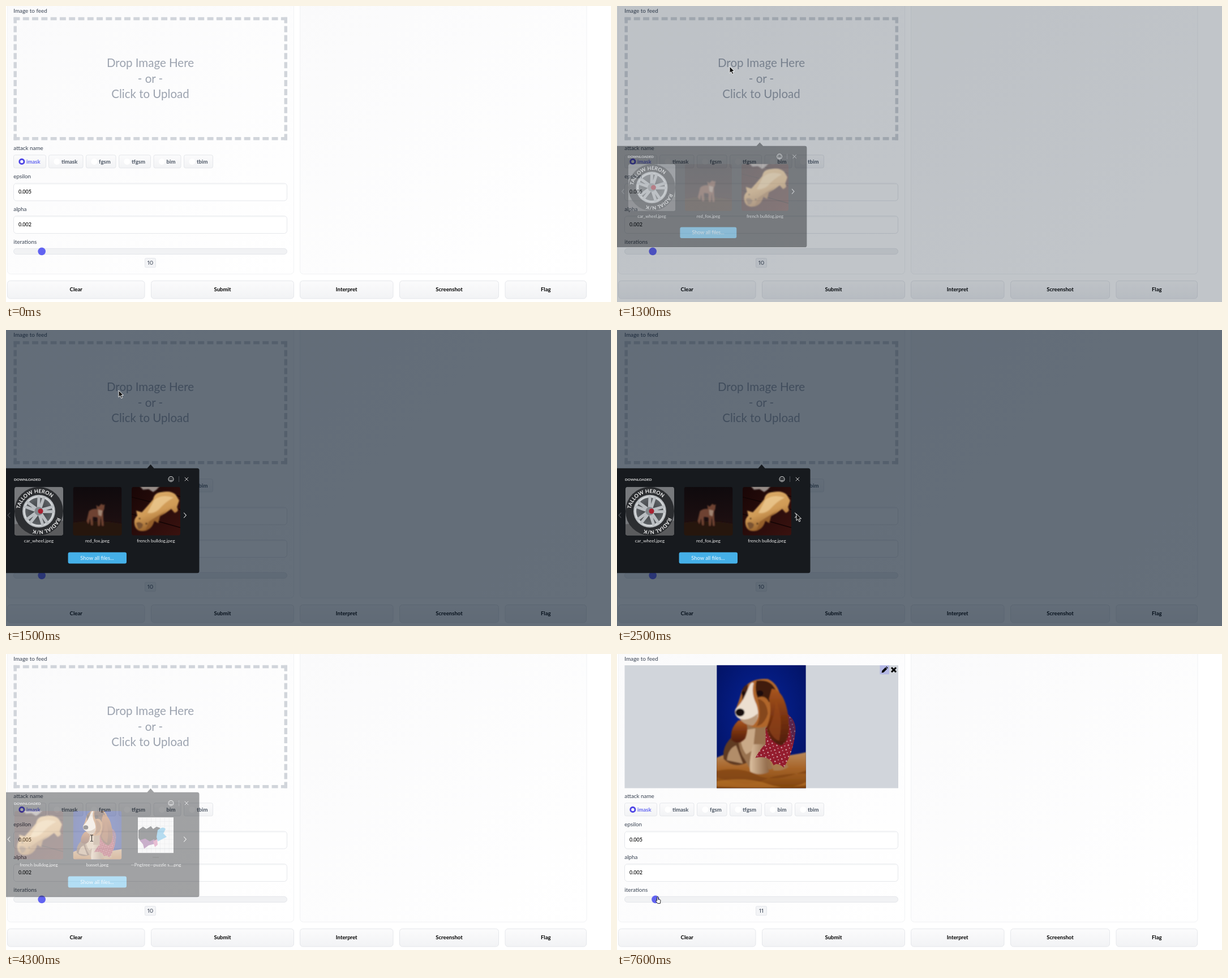
Recreate the animation shown at these times as an HTML page. Size 1069 by 524 pixels, loop 8 s.

```html
<!DOCTYPE html>
<html lang="en">
<head>
<meta charset="utf-8">
<title>Image upload form</title>
<style>
html, body { margin: 0; width: 100%; height: 100%; overflow: hidden; background: #fff; }
svg { display: block; }
text { font-family: Lato, "Open Sans", sans-serif; }
.label { font-size: 9.9px; fill: #374151; font-variant-numeric: proportional-nums; }
.value { font-size: 9px; font-weight: 600; fill: #111; }
.strong { font-size: 9.6px; font-weight: 700; }
.mid { text-anchor: middle; }
.line { fill: none; stroke: #dcdcdc; stroke-width: 1.1; }
</style>
</head>
<body>
<svg id="stage" width="1069" height="524" viewBox="0 0 1069 524">
<defs>
  <linearGradient id="panel" x2="1" y2="1"><stop stop-color="#fafafb"/><stop offset="1" stop-color="#fff"/></linearGradient>
  <linearGradient id="btn" x2="0" y2="1"><stop stop-color="#fbfbfc"/><stop offset="1" stop-color="#f2f3f5"/></linearGradient>
  <radialGradient id="blue" cy=".4" r=".75"><stop stop-color="#06249a"/><stop offset="1" stop-color="#02105c"/></radialGradient>
  <linearGradient id="sand" x2="0" y2="1"><stop stop-color="#b98a5c"/><stop offset=".4" stop-color="#a8662a"/><stop offset="1" stop-color="#7a3d08"/></linearGradient>
  <linearGradient id="ear" x2="0" y2="1"><stop stop-color="#a9561f"/><stop offset=".55" stop-color="#74300f"/><stop offset="1" stop-color="#4e1c0b"/></linearGradient>
  <linearGradient id="leg" x2="1" y2="0"><stop stop-color="#dcc0a0"/><stop offset="1" stop-color="#8d6544"/></linearGradient>
  <linearGradient id="floor" x2="1" y2="1"><stop stop-color="#180606"/><stop offset="1" stop-color="#3a120f"/></linearGradient>
  <linearGradient id="dusk" x2="0" y2="1"><stop stop-color="#0f0a0d"/><stop offset=".6" stop-color="#1a0e10"/><stop offset="1" stop-color="#241211"/></linearGradient>
  <linearGradient id="coat" x2=".4" y2="1"><stop stop-color="#e0b26e"/><stop offset=".6" stop-color="#cf9a56"/><stop offset="1" stop-color="#8f5a26"/></linearGradient>
  <radialGradient id="rim"><stop stop-color="#3a3d40"/><stop offset=".8" stop-color="#5b5f63"/><stop offset=".86" stop-color="#dfe2e4"/><stop offset="1" stop-color="#a4a8ac"/></radialGradient>
  <pattern id="dots" width="9" height="9" patternUnits="userSpaceOnUse" patternTransform="rotate(25)">
    <rect width="9" height="9" fill="#941c2e"/><circle cx="3" cy="3" r="1.2" fill="#d9b4b8"/><circle cx="7" cy="7" r=".9" fill="#d9b4b8"/>
  </pattern>
  <filter id="soft"><feGaussianBlur stdDeviation=".9"/></filter>
  <clipPath id="round"><rect width="86" height="86" rx="4"/></clipPath>
  <clipPath id="view"><rect x="13" y="270" width="297" height="115"/></clipPath>
  <path id="topArc" d="M9.500 39A34 34 0 0 1 77 43"/>
  <path id="lowArc" d="M75.500 54A34 34 0 0 1 20 68"/>

  <symbol id="basset" viewBox="0 0 157 218" preserveAspectRatio="xMidYMid slice">
    <rect width="157" height="218" fill="url(#blue)"/>
    <g filter="url(#soft)">
      <path d="M-5 166Q30 148 70 157T162 153V223H-5Z" fill="url(#sand)"/>
      <path d="M-5 188Q40 178 70 194T162 184V192Q110 190 80 204T-5 196Z" fill="#7a3f0e" opacity=".6"/>
      <path d="M-5 206Q50 196 90 210T162 204V212Q90 220 -5 214Z" fill="#c98235" opacity=".5"/>
      <path d="M12 166Q8 136 40 118L66 126L54 172Q30 184 12 166Z" fill="#603a22"/>
      <path d="M18 168Q20 148 34 142L46 174Z" fill="#b28d69"/>
      <path d="M40 112Q34 146 50 168L60 186L96 184L114 168Q124 126 108 88L60 94Z" fill="#997250"/>
      <path d="M42 116Q40 142 52 158L64 150L68 112Z" fill="#c9a987"/>
      <path d="M64 140Q56 172 59 188Q74 197 92 189Q86 166 86 140Z" fill="url(#leg)"/>
      <path d="M92 166L100 186Q114 188 126 180L116 160Z" fill="#a87a4e"/>
    </g>
    <path d="M86 112L120 84Q142 96 138 122Q134 156 118 181Q108 172 100 177Q92 158 68 164Q78 146 86 140Z" fill="url(#dots)"/>
    <g filter="url(#soft)">
      <path d="M120 84Q142 96 138 122L130 146Q134 112 120 84Z" fill="#2a2a62" opacity=".55"/>
      <path d="M38 98Q22 114 26 132Q38 143 50 130Q57 112 51 98Z" fill="url(#ear)"/>
      <path d="M44 46Q58 22 90 25Q112 34 114 70Q106 104 82 110Q56 114 48 97Q31 93 32 81Q39 66 44 46Z" fill="#b0662c"/>
      <path d="M70 28Q100 24 106 52L92 66Q86 52 72 58Q66 42 70 28Z" fill="#3f1d10"/>
      <path d="M44 48Q46 38 55 34L54 54L45 62Z" fill="#4a2414"/>
      <path d="M72 60Q88 62 90 86Q84 106 70 108Q80 92 72 60Z" fill="#85461d"/>
      <path d="M58 36Q61 30 65 32Q60 50 70 70Q78 94 64 106Q50 106 45 97Q29 92 33 78Q45 66 50 54Z" fill="#ecdfd0"/>
      <path d="M40 95Q56 100 72 86Q72 102 62 107Q48 106 40 95Z" fill="#b99879"/>
      <path d="M97 42Q119 44 126 90Q132 132 114 142Q94 138 87 112Q99 86 92 60Z" fill="url(#ear)"/>
      <path d="M104 62Q118 92 110 134Q98 130 92 112Q102 92 104 62Z" fill="#98491b" opacity=".6"/>
      <ellipse cx="41" cy="84" rx="8" ry="7" fill="#17100f"/>
      <ellipse cx="76" cy="50" rx="6" ry="5" fill="#1a0c08"/>
      <ellipse cx="47" cy="50" rx="3.2" ry="4" fill="#1a0c08"/>
    </g>
  </symbol>

  <symbol id="wheel" viewBox="0 0 86 86">
    <rect width="86" height="86" fill="#77797c"/><path d="M0 66L86 60V86H0Z" fill="#5a5b5d"/>
    <circle cx="43" cy="43" r="43" fill="#2c2e31"/>
    <circle cx="43" cy="43" r="29" fill="url(#rim)"/>
    <g id="spokes" fill="#b9bdc1"></g>
    <circle cx="43" cy="43" r="7.500" fill="#84888c"/><circle cx="46" cy="43" r="4.500" fill="#a82030"/>
    <g font-size="9.200" font-weight="700" fill="#f2f2f2">
      <text><textPath href="#topArc">TALLOW HERON</textPath></text>
      <text><textPath href="#lowArc">RADIAL N/K</textPath></text>
    </g>
  </symbol>

  <symbol id="fox" viewBox="0 0 86 86">
    <rect width="86" height="86" fill="url(#dusk)"/>
    <g filter="url(#soft)">
      <path d="M-4 64Q40 56 90 66V90H-4Z" fill="#27130f"/>
      <path d="M28 43Q34 38 42 39L41 32L45 35L50 30L53 32L56 31L55 39L53 44L54 69H51L49 54L47 69H44L43 54L35 53L35 68H32L30 56L27 66L24 60Z" fill="#6e4331"/>
      <path d="M44 40L52 42L50 52L45 50Z" fill="#a08472"/>
    </g>
  </symbol>

  <symbol id="bulldog" viewBox="0 0 86 86">
    <rect width="86" height="86" fill="url(#floor)"/>
    <path d="M0 18L86 40M0 48L86 72M20 0L86 17" stroke="#120404" stroke-width="1.500"/>
    <g filter="url(#soft)">
      <path d="M14 -2L20 5L30 4L38 9L44 5L50 -2Z" fill="#978c87"/>
      <path d="M6 70Q2 58 10 51L8 42L18 45Q28 34 38 22Q40 10 54 9Q70 6 78 14L84 24L80 36Q85 43 76 46L70 39Q60 47 50 52L47 64L40 60Q36 76 22 78Q10 80 6 70Z" fill="url(#coat)"/>
      <path d="M40 23Q54 12 74 19Q60 26 48 40Q38 48 28 46Z" fill="#efcf98" opacity=".7"/>
      <path d="M30 62Q44 52 62 42L50 52L47 64L40 60Q36 74 24 78Z" fill="#8a5524" opacity=".7"/>
      <path d="M8 64Q14 60 20 66Q20 74 12 75Z" fill="#7a5230"/>
      <circle cx="14" cy="56" r="1.500" fill="#2c170b"/><circle cx="26" cy="65" r="1.500" fill="#2c170b"/>
    </g>
  </symbol>

  <symbol id="puzzle" viewBox="0 0 86 86">
    <rect x="11" y="11.5" width="63" height="63" fill="#f1f1f2"/>
    <path id="grid" stroke="#cfd0d4" stroke-width=".6"/>
    <path d="M12 34L20 28L26 32L34 27L38 32L44 28L50 30L52 38L47 44L49 50L42 52L38 57L30 54L24 58L16 54L12 48Z" fill="#171a1e"/>
    <path d="M46 34Q56 26 60 32L56 40L62 46L54 50L46 54L44 46Z" fill="#4aa9dc"/>
    <path d="M14 52L24 49L32 54L40 50L42 58L30 61L22 67L20 59Z" fill="#7b3a7e"/>
    <path d="M38 54L45 50L46 60L41 64Z" fill="#c85b92"/>
    <rect x="37" y="81.5" width="11" height="1.5" fill="#000"/>
  </symbol>
</defs>

<rect width="1069" height="524" fill="#fff"/>
<g stroke="#f1f2f4" fill="url(#panel)">
  <rect x="2.5" y="-20" width="506" height="494.5" rx="6"/>
  <rect x="519.5" y="-20" width="506.5" height="494.5" rx="6"/>
</g>
<g id="form"></g>

<g id="drop">
  <g stroke="#d1d5db" stroke-width="5.46">
    <path d="M13.5 22.5H497M13.5 234.7H497" stroke-dasharray="10.92 5.37"/>
    <path d="M16.2 19.7V237.5M494.3 19.7V237.5" stroke-dasharray="10.92 4.99"/>
  </g>
  <g class="mid" font-size="20.5" fill="#9ca3af">
    <text x="255" y="108.3">Drop Image Here</text>
    <text x="255" y="135.6">- or -</text>
    <text x="255" y="162.9">Click to Upload</text>
  </g>
</g>
<g id="photo">
  <rect x="13.5" y="20" width="483.5" height="217.5" fill="#d1d5db"/>
  <use href="#basset" x="176.2" y="19.8" width="157.6" height="217.7"/>
  <rect x="464.5" y="20" width="16.5" height="16" fill="#b4b8e4"/>
  <path d="M467.6 33.2L468.4 29.6L474.4 23.6L477.2 26.4L471.2 32.4ZM475.2 22.9L476.2 22L478.9 24.7L478 25.700Z"/>
  <path d="M485 24L493 32M493 24L485 32" stroke="#000" stroke-width="3"/>
</g>

<rect id="shade" width="1069" height="524" fill="#0b1a2b"/>
<g id="dialog">
  <path d="M-20 244.7H249.5L255.5 238L261.5 244.7H338Q341.5 244.7 341.5 248.2V426.700Q341.5 430.2 338 430.2H-20Z" fill="#171a1e"/>
  <text x="14" y="266.8" font-size="6.4" font-weight="700" fill="#e2e2e2">DOWNLOADED</text>
  <g class="line">
    <circle cx="291.5" cy="264" r="4.5"/>
    <path d="M289 265.2Q291.5 268.4 294 265.2M289.8 262V263.2M293.2 262V263.2"/>
    <path d="M305.5 259V269" stroke="#4a4d51"/>
    <path d="M315.8 260.8L322.2 267.2M322.2 260.8L315.8 267.2" stroke-width=".9"/>
    <path id="prev" d="M7.3 323.5L3.2 328L7.3 332.5"/>
    <path d="M314.2 323.5L318.3 328L314.2 332.5"/>
  </g>
  <g clip-path="url(#view)"><g id="strip"></g></g>
  <rect x="109.6" y="393.4" width="103.4" height="20.2" rx="3" fill="#45b0e8"/>
  <text class="mid" x="161" y="406.7" font-size="9.3" fill="#eef8ff">Show all files...</text>
</g>

<path id="arrow" d="M0 0V11.8L2.7 9.3L4.8 13.8L6.9 12.8L4.8 8.5H8.5Z" fill="#111" stroke="#fff" stroke-width=".9"/>
<path id="beam" d="M-2.3 -5.5H-.6L0 -5L.6 -5.5H2.3M0 -5V5M-2.3 5.5H-.6L0 5L.6 5.5H2.3" fill="none" stroke="#222"/>
<path id="hand" d="M2.6 7.5V1.6a1.1 1.1 0 0 1 2.2 0V5l3.2 .7q1 .3 1 1.4L8.3 12.3H3.8L.7 8.4q-.4-1.2 .7-1.4z" fill="#fff" stroke="#111" stroke-width=".9"/>
</svg>

<script>
const $ = id => document.getElementById(id);
const form = $("form");

function add(parent, tag, attrs, text) {
  const el = document.createElementNS("http://www.w3.org/2000/svg", tag);
  for (const k in attrs) el.setAttribute(k, attrs[k]);
  if (text) el.textContent = text;
  return parent.appendChild(el);
}
const box = (x, y, w, h, rx, fill) =>
  add(form, "rect", { x, y, width: w, height: h, rx, fill, stroke: "#e5e7eb" });
const label = (x, y, text, cls = "label", color = "") =>
  add(form, "text", { x, y, class: cls, ...(color && { fill: color }) }, text);

label(13.3, 11.5, "Image to feed");
label(13.3, 255.2, "attack name");
label(13.3, 305, "epsilon");
label(13.3, 363, "alpha");
label(13.3, 420.7, "iterations");

[["imask", 13.5, 57], ["timask", 75.5, 60.5], ["fgsm", 141.5, 52.5],
 ["tfgsm", 199.5, 56], ["bim", 261, 48], ["tbim", 314.5, 51]].forEach(([name, x, w], i) => {
  box(x, 263.8, w, 23, 3, "url(#btn)");
  const ring = i ? {} : { stroke: "#4f46e5", "stroke-width": 2.9 };
  add(form, "circle", { cx: x + 14.4, cy: 275.4, r: i ? 5.5 : 4.1, fill: "#fff", ...ring });
  label(x + 22.5, 278.6, name, "strong", i ? "#4b5563" : "#6366f1");
});

for (const [y, text] of [[314, "0.005"], [371.8, "0.002"]]) {
  box(13.5, y, 483, 30.8, 5, "#fff");
  add(form, "path", { d: `M17 ${y + 1.2}H493`, stroke: "#f1f2f4" });
  label(22, y + 18.3, text, "value");
}

box(13.5, 429.3, 483, 10.2, 5.1, "#f1f2f4");
const knob = add(form, "circle", { cy: 434.4, r: 6.8, fill: "#6163f1" });
box(245.5, 446.5, 19, 16.3, 2, "#f3f4f6");
const count = label(255, 458.3, "10", "label mid");

for (const [text, l, r] of [["Clear", 2.5, 245], ["Submit", 256.5, 508.5], ["Interpret", 519.5, 684],
                            ["Screenshot", 695.5, 870.5], ["Flag", 882, 1025.5]]) {
  box(l, 486.5, r - l, 31.5, 5, "url(#btn)");
  label((l + r) / 2, 505.2, text, "strong mid", "#000");
}

for (let i = 0; i < 5; i++)
  add($("spokes"), "path", { d: "M39 40L36 17H41L43 30L45 17H50L47 40Z", transform: `rotate(${i * 72 + 10} 43 43)` });

let grid = "";
for (let i = 1; i < 8; i++) {
  const p = 11 + i * 7.9;
  grid += `M${p} 11.5V74.5M11 ${p}H74`;
}
$("grid").setAttribute("d", grid);

[["wheel", "car_wheel.jpeg"], ["fox", "red_fox.jpeg"], ["bulldog", "french bulldog.jpeg"],
 ["basset", "basset.jpeg"], ["puzzle", "—Pngtree—puzzle s....png"]].forEach(([id, name], i) => {
  const g = add($("strip"), "g", { transform: `translate(${15 + i * 103.5} 277.7)` });
  const pic = add(g, "g", { "clip-path": "url(#round)" });
  add(pic, "use", { href: "#" + id, width: 86, height: 86 });
  add(g, "text", { class: "mid", x: 43, y: 98.7, "font-size": 8.05, fill: "#e8e8e8" }, name);
});

// Eased lookup in [time, ...values] keys
function at(keys, t) {
  const i = keys.findIndex(k => k[0] > t);
  if (i < 0) return keys[keys.length - 1].slice(1);
  if (!i) return keys[0].slice(1);
  const a = keys[i - 1], b = keys[i];
  const p = (t - a[0]) / (b[0] - a[0]), e = p * p * (3 - 2 * p);
  return a.slice(1).map((v, n) => v + (b[n + 1] - v) * e);
}

const pointer = [
  [200, 38.5, 19], [800, 199, 107], [1600, 199, 107], [2200, 303, 357], [2500, 317, 325.5],
  [3200, 317, 325.5], [3500, 306, 426], [3800, 274, 380], [4000, 274, 380], [4100, 151, 323.5],
  [4200, 151, 323.5], [4300, 151.5, 326], [5100, 151.5, 326], [5200, 149.5, 326], [6000, 119.5, 349],
  [6500, 59.5, 430], [7200, 59.5, 430], [7600, 68, 429.3]
];
// shade, dialog opacity, dialog scale
const popup = [
  [1100, 0, 0, .94], [1200, .07, .1, .945], [1300, .25, .43, .966], [1400, .47, .85, .992],
  [1500, .627, 1, 1], [4200, .627, 1, 1], [4300, 0, .4, 1], [4500, 0, .4, 1], [4600, 0, 0, 1]
];
const scroll = [[3100, 0], [3500, 207]];

function cursor(t, y) {
  if (t < 100) return "";
  if (t < 300) return "beam";
  if (t < 4300) return "arrow";
  if (t < 6100) return "beam";
  if (y > 426) return "hand";
  return y > 371 && y < 403 ? "beam" : "arrow";
}

const show = (el, on) => el.setAttribute("visibility", on ? "visible" : "hidden");

function draw(t) {
  const [shade, alpha, scale] = at(popup, t);
  $("shade").setAttribute("opacity", shade);
  $("dialog").setAttribute("opacity", alpha);
  $("dialog").setAttribute("transform", `translate(161.5 337.5) scale(${scale}) translate(-161.5 -337.5)`);
  $("strip").setAttribute("transform", `translate(${-at(scroll, t)[0]} 0)`);
  $("prev").setAttribute("stroke", t < 3200 ? "#55585c" : "#e8e8e8");

  show($("drop"), t < 4600);
  show($("photo"), t >= 4600);

  const n = t < 7400 ? 10 : 11;
  knob.setAttribute("cx", 63.2 + (n - 10) * 4.8);
  count.textContent = n;

  const [x, y] = at(pointer, t), kind = cursor(t, y);
  for (const id of ["arrow", "beam", "hand"]) {
    show($(id), id === kind);
    $(id).setAttribute("transform", `translate(${x} ${y})`);
  }
}

const start = performance.now();
function tick() {
  const t = (performance.now() - start) % 8000;
  draw(Math.floor(t / 100) * 100); // ten pictures a second
  requestAnimationFrame(tick);
}
tick();
</script>
</body>
</html>
```
